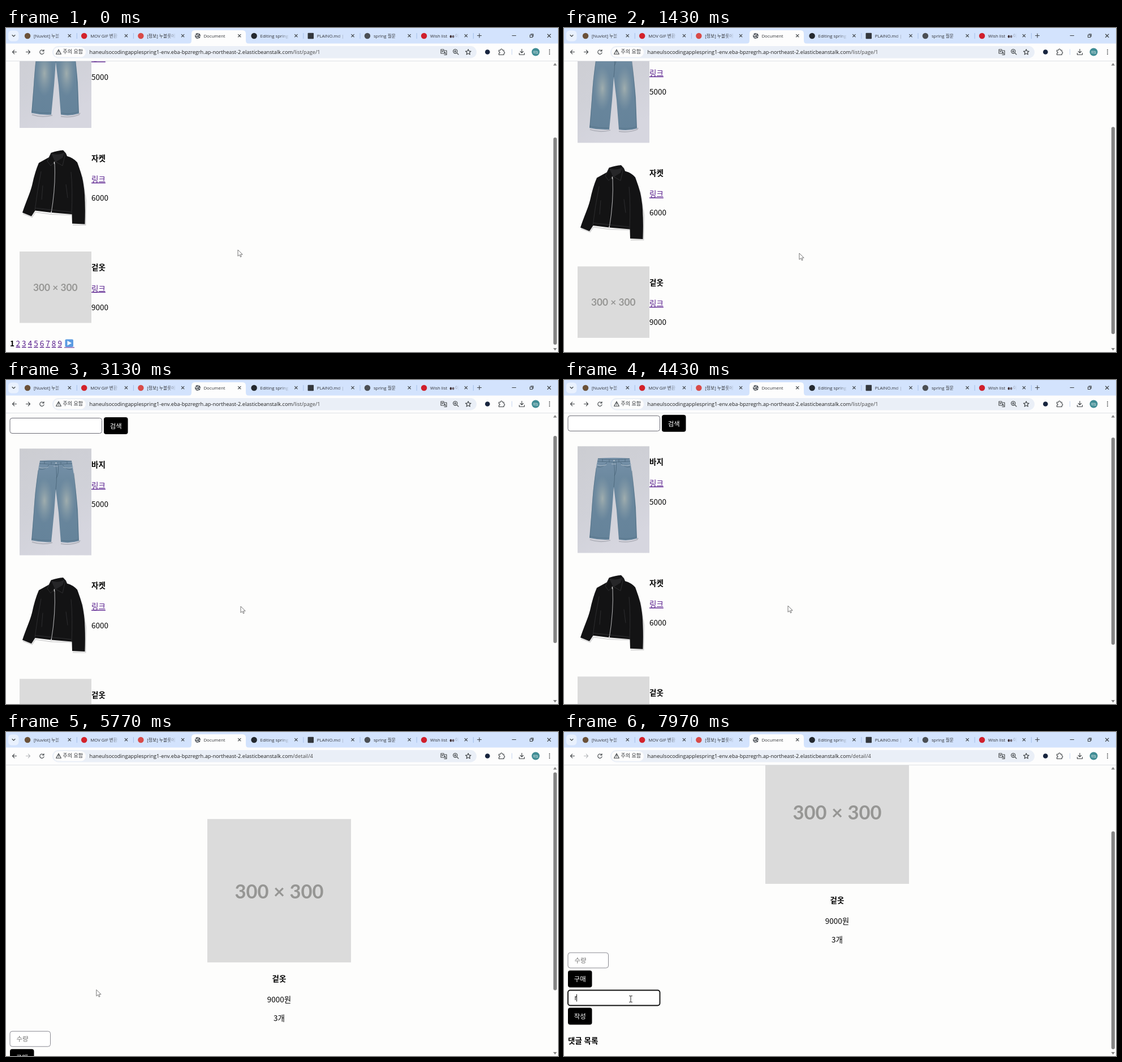
Write an HTML page that moves like this. It is 976 px wide and 574 px high and loops after 8000 ms.

```html
<!DOCTYPE html>
<html lang="ko">
<head>
<meta charset="utf-8">
<title>Document</title>
<style>
html, body { margin: 0; height: 100%; overflow: hidden; background: #fdfdfc; }
svg { display: block; width: 100%; height: 100%; }
text { white-space: pre; }
.page { font: 13.5px "Noto Sans CJK KR", "Noto Sans KR", "Noto Sans CJK JP", sans-serif; }
.ui { font: 7.8px "Open Sans", "Noto Sans CJK KR", "Noto Sans CJK JP", sans-serif; fill: #303236; }
.b { font-weight: 700; }
.a { fill: #551a8b; text-decoration: underline; }
.mid { text-anchor: middle; }
.form { font-size: 11.4px; }
.hold { font-family: Lato, sans-serif; font-weight: 700; fill: #969694; text-anchor: middle; }
.line { fill: none; stroke: #3c4043; stroke-width: 1.1; stroke-linecap: round; stroke-linejoin: round; }
</style>
</head>
<body>
<svg viewBox="0 0 976 574">
  <defs>
    <linearGradient id="wall" x2=".4" y2="1"><stop stop-color="#cccdd2"/><stop offset=".6" stop-color="#d0d1d8"/><stop offset="1" stop-color="#d6d6df"/></linearGradient>
    <linearGradient id="denim" x2="0" y2="1"><stop stop-color="#7590a8"/><stop offset=".25" stop-color="#6c899f"/><stop offset="1" stop-color="#65839a"/></linearGradient>
    <radialGradient id="worn"><stop stop-color="#a9b4b1" stop-opacity=".85"/><stop offset="1" stop-color="#8fa2ab" stop-opacity="0"/></radialGradient>
    <linearGradient id="fade"><stop stop-color="#d3e3fd" stop-opacity="0"/><stop offset=".8" stop-color="#d3e3fd"/></linearGradient>
  </defs>
  <rect width="976" height="574" fill="#fdfdfc"/>

  <g id="list" class="page">
    <rect x="7" y="67.5" width="162.5" height="27" rx="4" fill="#fff" stroke="#6c6c76"/>
    <rect x="173" y="66" width="42.5" height="30" rx="4"/>
    <text class="form mid" x="194.2" y="85.7" fill="#fff">검색</text>
    <rect x="24" y="121.5" width="127" height="189" fill="url(#wall)"/>
    <path d="M46 287Q64 293 82 288M97 290Q114 293 129 287L131 284" fill="none" stroke="#b3b4bd" stroke-width="2"/>
    <path d="M60 143Q88 141 116 143C121 170 125 205 127 230L129 285Q113 290 97 287L93 235 88 194 85 235 80 287Q62 288 45 284L49 235C51 205 54 172 60 143Z" fill="url(#denim)"/>
    <ellipse cx="68" cy="214" rx="15" ry="40" fill="url(#worn)"/>
    <ellipse cx="107" cy="214" rx="15" ry="40" fill="url(#worn)"/>
    <g fill="none" stroke="#496579" stroke-width=".8">
      <path d="M59 148Q88 151 117 148M60 143.500Q88 147 116 143.500M88 149Q91 170 88 194M92 149Q94 166 89 174M59 158Q70 160 76 150M117 158Q106 160 100 150M68 144v5M80 145v5M97 145v5M108 144v5"/>
      <path d="M57 160Q51 200 49 240L46 284M120 165Q126 215 128 282M45 281Q62 285 80 284M97 284Q113 287 129 282" opacity=".6"/>
    </g>
    <path d="M57 154Q66 158 75 154M101 154Q110 158 119 154M84 153h8" fill="none" stroke="#a0b2c1" stroke-width="1.2"/>
    <circle cx="88.500" cy="147" r="1" fill="#dfe2e3"/>

    <g transform="translate(0 133.500)">
      <path d="M30 329l16 6 6-9 28 4 36 1M118 349h22.500l1-44-7-42" fill="none" stroke="#d9d9d9" stroke-width="2"/>
      <path d="M58 239L76 229 80 221Q91 217 101 216.500L106 222 108 227Q119 230 126 238C131 252 135 262 137 277Q141 300 139.500 347.500L117 346.500 116.500 330 80 327 51.500 323.500 45 333.500 29 327C36 306 42 294 46 279Q51 255 58 239Z" fill="#131314"/>
      <path d="M80 222Q92 227 104 220L100 230 87 238Z" fill="#262628"/>
      <g fill="none" stroke="#303033" stroke-width=".9">
        <path d="M80 221l-7 15 6 8 8-8M105 222l-5 22-12-7M62 254Q55 290 51 323M115 255Q118 285 116 330M52 319l63 7M65 279l-2 25M106 277l3 24"/>
      </g>
      <path d="M86 240Q88 280 80 328" fill="none" stroke="#a9a9ab" stroke-width="1.1"/>
      <path d="M85.500 237v4M80 325v4" stroke="#ddd" stroke-width="1.4"/>
    </g>

    <rect x="24" y="529.500" width="127" height="126.500" fill="#dbdbdb"/>
    <text class="hold" x="87.300" y="599.200" font-size="17.300">300 × 300</text>
    <g id="items"></g>
    <text id="pager" y="697.500"></text>
    <path d="M103 699.500h18" stroke="#551a8b"/>
    <rect x="104.500" y="685" width="14.500" height="13.500" rx="2" fill="#5b9be2"/>
    <path d="M108.500 687.500l7.500 4.300-7.500 4.300z" fill="#fff"/>
  </g>

  <g id="detail" class="page">
    <rect x="356" y="15" width="254" height="254" fill="#dbdbdb"/>
    <text class="hold" x="483" y="155.300" font-size="34.600">300 × 300</text>
    <text class="b mid" x="483" y="302.700">겉옷</text>
    <text class="mid" x="483" y="340">9000원</text>
    <text class="mid" x="483" y="373">3개</text>
    <g class="form">
      <rect x="7" y="391" width="71.500" height="27" rx="4" fill="#fff" stroke="#8a8a92"/>
      <text x="18.500" y="408.500" fill="#757575">수량</text>
      <rect x="7" y="422.500" width="42.500" height="30" rx="4"/>
      <text class="mid" x="28.200" y="442" fill="#fff">구매</text>
      <rect id="field" x="7" y="457.500" width="162.500" height="27" rx="4" fill="#fff"/>
      <text id="typed" x="18.500" y="474.500">r</text>
      <path id="caret" d="M18.500 464.500v13" stroke="#111"/>
      <rect x="7" y="488.500" width="42.500" height="30" rx="4"/>
      <text class="mid" x="28.200" y="508" fill="#fff">작성</text>
    </g>
    <text class="b" x="7" y="551.500">댓글 목록</text>
  </g>

  <rect x="966" y="59" width="10" height="515" fill="#fcfcfc"/>
  <path d="M967.500 66.500h6.500l-3.200-4.500zM967.500 567h6.500l-3.200 4.500z" fill="#858585"/>
  <rect id="thumb" x="967.800" width="6.200" rx="3" fill="#858585"/>

  <g class="ui">
    <rect width="976" height="28" fill="#d3e3fd"/>
    <rect y="27.500" width="976" height="31" fill="#fdfdfd"/>
    <path d="M0 58.500h976" stroke="#dfe1e5"/>
    <path d="M322 28q6 0 6-6V10q0-6 6-6h84q6 0 6 6v12q0 6 6 6z" fill="#fdfdfd"/>
    <rect x="4" y="4.500" width="18.500" height="19" rx="6" fill="#e9f1fe"/>
    <path class="line" d="M11 12.500l2.500 2.500 2.500-2.500"/>
    <g id="tabs"></g>
    <g id="globe"><circle cx="339" cy="14" r="5" fill="#50555b"/><path d="M335 12q2 2 4 1l1-3M336 16l3 0 1 2M341 14l2.500 1" class="line" style="stroke:#fff"/></g>
    <circle id="spinner" class="line" cx="339" cy="14" r="5" transform="rotate(-90 339 14)"/>
    <path class="line" d="M833.500 13.500h7M837 10v7M895 13.500h6.500M957.500 11l5.500 5.500M963 11l-5.500 5.500"/>
    <path class="line" d="M926.500 12.300h4.200v4.200h-4.200zM928 10.800h4.200v4.200" stroke-width=".9"/>

    <path class="line" d="M18.500 42.500h-7m3.200-3.300l-3.200 3.300 3.200 3.300"/>
    <path id="forward" class="line" d="M35.500 42.500h7m-3.200-3.300l3.200 3.300-3.200 3.300"/>
    <path id="reload" class="line" d="M66.500 40.500a3.700 3.700 0 1 0 .6 3M67 38.500v2.500h-2.500"/>
    <path id="stop" class="line" d="M60.700 39.500l6 6M66.700 39.500l-6 6"/>
    <rect x="82" y="32" width="750" height="21.500" rx="10.700" fill="#eaeff7"/>
    <rect x="84" y="34" width="57" height="17.500" rx="8.700" fill="#fdfdfd"/>
    <path class="line" d="M93 38.200l4.400 8h-8.800zM93 41v2.300M93 44.700v.1"/>
    <text x="100.500" y="45.300" font-size="9" style="font-family:'Noto Sans CJK KR','Noto Sans CJK JP',sans-serif">주의 요함</text>
    <text x="147.500" y="45.800" font-size="9.200" fill="#1f1f1f">haneulsocodingapplespring1-env.eba-bpzregrh.ap-northeast-2.elasticbeanstalk.com<tspan id="path" fill="#474747"></tspan></text>

    <path class="line" d="M769 38h5l1.500 7h-6.500zM776 40h3v7.500h-4M770.500 40.500h2.500M771.700 40.500v2M776 43l1.500 2.500" stroke-width=".9"/>
    <path class="line" d="M797.200 44.200l2.800 2.800M792.500 41.300h3.500M794.300 39.500v3.500"/>
    <circle class="line" cx="794.300" cy="41.300" r="3.600"/>
    <path class="line" d="M817.300 37.700l1.400 3.200 3.500.3-2.700 2.300.9 3.500-3.100-1.900-3.100 1.900.9-3.500-2.700-2.300 3.500-.3z"/>
    <circle cx="851.300" cy="42.500" r="4.300" fill="#17243e"/>
    <path class="line" d="M871.500 39.300h2.800q.2-2.300 1.700-2.300t1.700 2.300h2.500v2.700q1.600.2 1.600 1.700t-1.600 1.600v2.200h-8.700v-2.600q1.700-.3 1.700-1.500t-1.700-1.500z"/>
    <path d="M894.500 37.500v10" stroke="#c9d8f2"/>
    <path class="line" d="M912 37.500v6.500m-2.800-2.700l2.800 2.700 2.800-2.700M907.500 44.500v2.700h9v-2.700"/>
    <circle cx="936.500" cy="42.500" r="7" fill="#3f8c94"/>
    <text class="mid" x="936.500" y="44.500" font-size="5.200" fill="#fff">하늘</text>
    <g fill="#3c4043"><circle cx="961" cy="39" r="1"/><circle cx="961" cy="42.500" r="1"/><circle cx="961" cy="46" r="1"/></g>
  </g>

  <g id="cursor">
    <path id="arrow" d="M0 0V11.200L2.700 8.800 4.500 12.700 6.200 12 4.500 8.200H8.200Z" fill="#fff" stroke="#555" stroke-width=".8"/>
    <path id="hand" d="M-1 1q1-1.500 2 0v4.500l4 .8q1.700.5 1.500 2.200l-1 4.500H0L-3.500 8.300q0-1.800 2.500-.3z" fill="#fff" stroke="#444" stroke-width=".8"/>
    <path id="beam" d="M-2.800-5.500H-.8L0-5 .8-5.500H2.800M0-5V5M-2.800 5.500H-.8L0 5 .8 5.500H2.800" fill="none" stroke="#222"/>
  </g>
</svg>
<script>
const $ = id => document.getElementById(id);
const show = (id, on) => $(id).style.display = on ? "" : "none";
const shift = (id, x, y) => $(id).setAttribute("transform", `translate(${x} ${y})`);

$("items").innerHTML = [["바지", 5000, 154.5], ["자켓", 6000, 369], ["겉옷", 9000, 562.700]].map(([name, price, y]) =>
  `<text class="b" x="151" y="${y}">${name}</text><text class="a" x="151" y="${y + 37.3}">링크</text><text x="151" y="${y + 70.5}">${price}</text>`).join("");

$("pager").innerHTML = [1, 2, 3, 4, 5, 6, 7, 8, 9].map(n =>
  `<tspan x="${7 + (n - 1) * 10.55}" class="${n > 1 ? "a" : "b"}">${n}</tspan>`).join("");

// title, icon colour, square icon
const tabs = [["[Nuvlot] 누블", "#6b5138"], ["MOV GIF 변환", "#d3222b"], ["[정보] 누블롯에", "#d84a48"], ["Document"],
  ["Editing spring", "#24292f"], ["PLAINO.md |", "#33373c", 1], ["spring 질문", "#4b4f54"], ["Wish list", "#d01f2c"]];
$("tabs").innerHTML = tabs.map(([title, color, square], i) => {
  const x = 38 + i * 100.15, active = i == 3;
  return (color ? `<rect x="${x - 5.2}" y="8.700" width="10.500" height="10.500" rx="${square ? 1 : 5.25}" fill="${color}"/>` : "") +
    `<text x="${x + 11}" y="17">${title}</text>` +
    (i == 7 ? `<g fill="#3d2b2e"><ellipse cx="786.500" cy="15" rx="1.900" ry="2.500"/><ellipse cx="790.800" cy="15" rx="1.900" ry="2.500"/></g><text x="794" y="17">이</text>` : "") +
    (active ? "" : `<rect x="${x + 47}" y="6" width="19" height="17" fill="url(#fade)"/>`) +
    `<path class="line" d="M${x + 72} 11.300l4.600 4.600m0-4.600l-4.600 4.600"/>` +
    (i == 2 || active ? "" : `<path d="M${x + 87.3} 9v10" stroke="#a5bfe8"/>`);
}).join("");

const LOOP = 8000, LOAD = 5380, OPEN = 5560, FOCUS = 7330, TYPE = 7930;
// time, x, y of the pointer
const path = [[0, 410, 393], [1240, 410, 393], [1433, 416, 399], [1667, 416, 401], [3100, 416, 401], [3133, 415, 401],
  [3340, 415, 401], [3433, 396, 400], [4600, 396, 400], [5200, 160, 460], [5700, 160, 460], [6100, 158, 414],
  [6700, 158, 414], [7280, 118, 473], [LOOP, 118, 473]];

const ease = p => (p = Math.min(1, Math.max(0, p)), p * p * (3 - 2 * p));

function pointer(t) {
  const i = path.findIndex(k => k[0] > t), [t0, x0, y0] = path[i - 1], [t1, x1, y1] = path[i];
  const p = ease((t - t0) / (t1 - t0));
  return [x0 + (x1 - x0) * p, y0 + (y1 - y0) * p];
}

function draw(now) {
  const t = Math.min(LOOP - 1, Math.floor(now % LOOP * .03 + .25) / .03);
  const open = t >= OPEN, loading = t >= LOAD && !open;
  const focus = t >= FOCUS, typed = t >= TYPE;

  // distance left to the bottom of each page
  const listOff = 133.5 * (ease((t - 1362) / 250) - ease((t - 4407) / 250));
  const detailOff = 141 * (1 - ease((t - 5750) / 250));
  show("list", !open);
  show("detail", open);
  shift("list", 0, listOff - 133.5);
  shift("detail", 0, detailOff);
  $("thumb").setAttribute("y", open ? 176 - detailOff * .75 : 194 - listOff * .7116);
  $("thumb").setAttribute("height", open ? 386 : 367);

  $("path").textContent = open ? "/detail/4" : "/list/page/1";
  $("forward").style.stroke = open ? "#b4b6b9" : "";
  show("reload", !loading);
  show("stop", loading);
  show("globe", !loading);
  show("spinner", loading);
  $("spinner").setAttribute("stroke-dasharray", `${Math.max(0, t - LOAD) * .06} 40`);

  $("field").setAttribute("stroke", focus ? "#101010" : "#6c6c76");
  $("field").setAttribute("stroke-width", focus ? 1.9 : 1);
  show("typed", typed);
  show("caret", focus && (t - (typed ? TYPE : FOCUS)) % 1000 < 500);
  shift("caret", typed ? 4 : 0, 0);

  const [x, y] = pointer(t);
  const overLink = !open && x > 151 && x < 176 && Math.abs(y - 462 - listOff) < 9;
  const overField = open && x > 7 && x < 170 && Math.abs(y - 471 - detailOff) < 14;
  shift("cursor", x, y);
  show("hand", overLink);
  show("beam", overField);
  show("arrow", !overLink && !overField);
}

let start;
function tick(now) {
  start ??= now;
  draw(now - start);
  requestAnimationFrame(tick);
}
draw(0);
requestAnimationFrame(tick);
</script>
</body>
</html>
```
